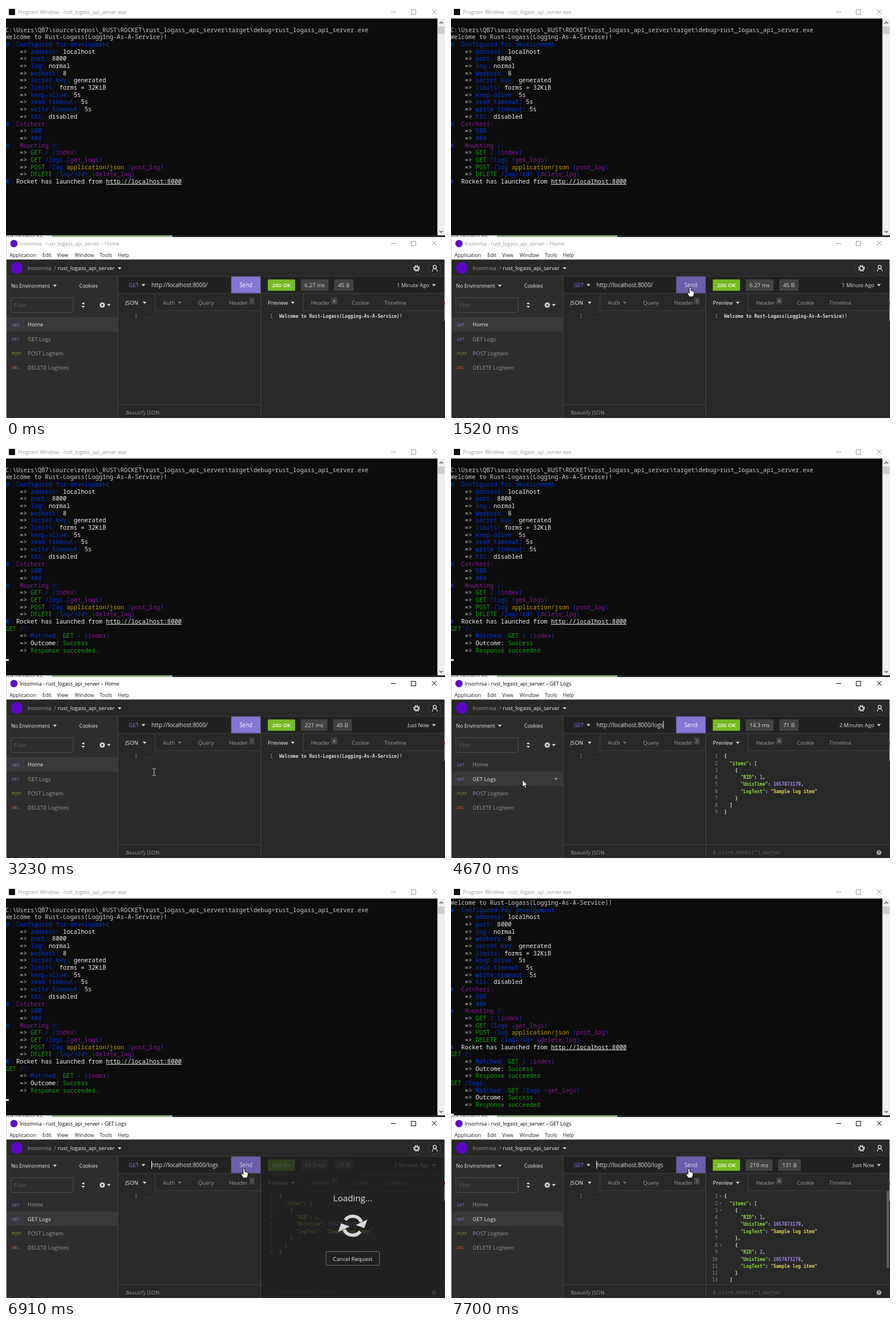
These frames come from a looping animation (773x724 px, 8000 ms). An HTML page:

```html
<!DOCTYPE html>
<html lang="en">
<head>
<meta charset="utf-8">
<title>API client and server</title>
<style>
  html, body { margin: 0; width: 100%; height: 100%; overflow: hidden; background: #282828; }
  svg { display: block; width: 773px; height: 724px; }
  text { white-space: pre; font-family: "Open Sans", "Noto Sans", sans-serif; }
  .term { font-family: "Noto Sans Mono", "DejaVu Sans Mono", monospace; }
  .code { font-family: "DejaVu Sans Mono", "Noto Sans Mono", monospace; }
  .body { font-weight: 700; }
</style>
</head>
<body>
<svg viewBox="0 0 773 724">
  <defs>
    <clipPath id="termClip"><rect y="22" width="759" height="382"/></clipPath>
    <clipPath id="stripClip"><rect y="403" width="80" height="4"/></clipPath>
    <clipPath id="codeClip"><rect x="449" y="537" width="323" height="163"/></clipPath>
  </defs>
  <g id="base"></g>
  <g id="live"></g>
</svg>
<script>
const LOOP = 8000;
const INK = {
  w: '#f2f2f2', d: '#cccccc', b: '#0037da', m: '#881798', g: '#13a10e', y: '#c19c00',
  k: '#8fdc3c', n: '#a98bf0', s: '#e6db5a', p: '#dddddd'
};
const PURPLE = '#8776d5', LINE = '#424242', PANE = '#282828';
const BAR = 490.5; // centre of the address row

const esc = s => s.replace(/&/g, '&amp;').replace(/</g, '&lt;').replace(/>/g, '&gt;');

// Shapes; text is placed by its vertical centre.
const rect = (x, y, w, h, fill, more = '') =>
  `<rect x="${x}" y="${y}" width="${w}" height="${h}" fill="${fill}" ${more}/>`;
const path = (d, stroke, width = 1, fill = 'none', more = '') =>
  `<path d="${d}" stroke="${stroke}" stroke-width="${width}" fill="${fill}" ${more}/>`;
const disc = (x, y, r, fill, more = '') =>
  `<circle cx="${x}" cy="${y}" r="${r}" fill="${fill}" ${more}/>`;
const label = (x, y, s, size, fill, more = '') =>
  `<text x="${x}" y="${y + size * .36}" font-size="${size}" fill="${fill}" ${more}>${esc(s)}</text>`;
const mid = (x, y, s, size, fill, more = '') => label(x, y, s, size, fill, `text-anchor="middle" ${more}`);
const caret = (x, y, fill = '#ddd') => path(`M${x - 3.4} ${y - 1.8}h6.8l-3.4 3.8z`, 'none', 0, fill);

// "~x" inside a line switches to ink x; "~u" underlines.
function inked(x, y, line, size, cls, start) {
  const bits = line.split(/~(\w)/);
  let out = `<tspan fill="${INK[start]}">${esc(bits[0])}</tspan>`;
  for (let i = 1; i < bits.length; i += 2) {
    const style = bits[i] === 'u' ? 'fill="#f2f2f2" text-decoration="underline"' : `fill="${INK[bits[i]]}"`;
    out += `<tspan ${style}>${esc(bits[i + 1])}</tspan>`;
  }
  return `<text class="${cls}" x="${x}" y="${y + size * .36}" font-size="${size}">${out}</text>`;
}

// ---- terminal ----
const setting = (key, value) => `    => ~b${key}: ~w${value}`;
const route = (verb, url, name, kind = '') => `    => ~g${verb} ~b${url} ~y${kind}~b(~m${name}~b)`;
const handled = (url, name) => [
  `~gGET ~b${url}:`,
  `    => ~bMatched: ~gGET ~b${url} (~m${name}~b)`,
  '    => ~wOutcome: ~gSuccess',
  '    => ~gResponse succeeded.'
];
const BOOT = [
  'C:\\Users\\QB7\\source\\repos\\_RUST\\ROCKET\\rust_logass_api_server\\target\\debug>rust_logass_api_server.exe',
  'Welcome to Rust-Logass(Logging-As-A-Service)!',
  '#~b  Configured for development.',
  setting('address', 'localhost'), setting('port', '8000'), setting('log', 'normal'),
  setting('workers', '8'), setting('secret key', 'generated'), setting('limits', 'forms = 32KiB'),
  setting('keep-alive', '5s'), setting('read timeout', '5s'), setting('write timeout', '5s'),
  setting('tls', 'disabled'),
  '#~m  Catchers:', '    => ~b500', '    => ~b404',
  '#~m   Mounting ~b/:',
  route('GET', '/', 'index'), route('GET', '/logs', 'get_logs'),
  route('POST', '/log', 'post_log', 'application/json '), route('DELETE', '/log/<id>', 'delete_log'),
  '#~w  Rocket has launched from ~uhttp://localhost:8000'
];

function terminal(t) {
  const lines = [...BOOT];
  if (t >= 2250) lines.push(...handled('/', 'index'));
  if (t >= 7030) lines.push(...handled('/logs', 'get_logs'));
  const pitch = 12.67, scrolled = t >= 7030 ? 2 : 0;
  let out = '';
  lines.forEach((line, i) => {
    if (i < scrolled - 1) return;
    const y = 42 + (i - scrolled) * pitch;
    if (line[0] === '#') {
      out += rect(.5, y - 2.5, 3.5, 5.5, '#0a1c58', `stroke="${INK.b}" stroke-width=".8"`);
      line = ' ' + line.slice(1);
    }
    out += inked(-1, y, line, 10.55, 'term', 'd');
  });
  if (t >= 2250) out += rect(0, 45.2 + (lines.length - scrolled) * pitch, 5, 3, INK.w);
  return `<g clip-path="url(#termClip)">${out}</g>`;
}

// ---- window chrome ----
const buttons = (y, ink) =>
  path(`M678 ${y + .5}h9M713.5 ${y - 3.5}h8v8h-8zM750 ${y - 4}l8 8m0-8l-8 8`, ink);

function base() {
  let out = rect(0, 0, 773, 724, PANE) + rect(0, 0, 773, 22, '#fff')
    + rect(5, 5, 11, 11, '#111')
    + label(21, 10.5, 'Program Window - rust_logass_api_server.exe', 9, '#999') + buttons(10, '#999')
    + rect(0, 22, 773, 382, '#0c0c0c') + rect(759.6, 22, 13.4, 382, '#f0f0f0')
    + rect(760.5, 36, 12, 13, '#cdcdcd')
    + path('M763.5 31l3-3 3 3M763.5 395l3 3 3-3', '#555', 1.4);

  out += rect(0, 403, 81, 4, '#e4e4e4') + rect(81, 403, 212, 3, '#93b673') + rect(293, 403, 480, 3, '#20252b')
    + `<g clip-path="url(#stripClip)">${label(0, 406.5, 'ed shelter to', 11, '#555')}</g>`
    + rect(0, 407, 1, 317, '#c8c8c8') + rect(772, 445, 1, 108, '#d8d8d8');

  out += rect(1, 406, 772, 39.5, '#fff') + disc(14, 417.5, 6.5, '#5a0ac4');
  [[6, 'Application'], [64, 'Edit'], [90, 'View'], [121, 'Window'], [165, 'Tools'], [197, 'Help']]
    .forEach(([x, s]) => out += label(x, 437.5, s, 9, '#222'));

  out += disc(19, 460.5, 10.5, '#5a0ac4') + label(38, 461, 'Insomnia', 9.7, '#999')
    + label(85, 461, '/', 9.7, '#888') + label(91, 461, 'rust_logass_api_server', 9.6, '#eee') + caret(200, 461)
    + disc(723, 461, 10.3, '#222', 'stroke="#454545"') + disc(755, 461, 10.3, '#222', 'stroke="#454545"')
    + disc(723, 461, 3.4, 'none', 'stroke="#eee" stroke-width="1.7"')
    + disc(723, 461, 5.2, 'none', 'stroke="#eee" stroke-width="1.8" stroke-dasharray="2 2.08"')
    + disc(755, 458.5, 2.8, 'none', 'stroke="#eee" stroke-width="1.3"')
    + path('M750.5 466.5c0-6.5 9-6.5 9 0', '#eee', 1.3);

  out += rect(1, 475.5, 196, 248.5, '#2d2d2d') + rect(198, 475.5, 250, 29, '#212121')
    + label(9, 491.5, 'No Environment', 9, '#eee') + caret(86, 491.5) + label(129, 491.5, 'Cookies', 9, '#eee')
    + rect(8.5, 512.5, 110, 26, 'none', 'rx="2" stroke="#4c4c4c"') + label(14, 525.5, 'Filter', 9, '#5c5c5c')
    + path('M133 524h6l-3-3.4zM133 527h6l-3 3.4z', 'none', 0, '#ddd')
    + disc(169.5, 525.5, 4.6, '#ddd') + path('M167 525.5h5M169.5 523v5', '#2d2d2d', 1.2) + caret(181, 525.5);

  out += path('M1 475h771M197.5 475v249M198 505h250M262.5 505v30M262 535.5h186M198 700.5h250M448.5 475v249', LINE)
    + label(216, BAR, 'GET', 9.8, PURPLE) + caret(242, BAR)
    + label(210, 521.5, 'JSON', 9.8, '#eee') + caret(244, 521.5)
    + label(276, 521.5, 'Auth', 9.8, '#999') + caret(306, 521.5, '#777')
    + label(338, 521.5, 'Query', 9.8, '#999') + label(393, 521.5, 'Header', 9.6, '#999')
    + rect(428, 512.5, 10, 12, '#424242', 'rx="1"') + mid(433, 518.5, '1', 7, '#bbb')
    + label(226.5, 545.5, '1', 8, '#777', 'class="code"') + label(243.5, 545.5, '...', 8, '#666', 'class="code"')
    + label(211, 714.5, 'Beautify JSON', 9.2, '#999');
  return out;
}

// ---- response pane ----
const item = (id, time, last) => [
  '    {', `      ~k"RID"~p: ~n${id}~p,`, `      ~k"UnixTime"~p: ~n${time}~p,`,
  '      ~k"LogText"~p: ~s"Sample log item"', last ? '    }' : '    },'
];
const logs = (...items) => ['{', '  ~k"items"~p: [', ...items.flat(), '  ]', '}'];
const HELLO = ['Welcome to Rust-Logass(Logging-As-A-Service)!'];
const REPLIES = [
  { from: 0, time: '6.27 ms', size: '45 B', age: '1 Minute Ago', tags: [519, 49, 578, 34], body: HELLO },
  { from: 2540, time: '221 ms', size: '45 B', age: 'Just Now', tags: [519, 47, 576, 33], body: HELLO },
  { from: 4550, time: '14.3 ms', size: '71 B', age: '2 Minutes Ago', tags: [519, 49, 578, 34], json: 1,
    folds: 4790, body: logs(item(1, 1657873179, true)) },
  { from: 7140, time: '219 ms', size: '131 B', age: 'Just Now', tags: [519, 47, 576, 40], json: 1,
    folds: 7580, body: logs(item(1, 1657873179), item(2, 1657873278, true)) }
];

const tag = (x, w, s, fill, ink, more) => rect(x, BAR - 10, w, 20, fill) + mid(x + w / 2, BAR, s, 9.7, ink, more);

function response(t) {
  const r = REPLIES.filter(e => t >= e.from).pop();
  const [tx, tw, sx, sw] = r.tags;
  let out = rect(449, 475.5, 323, 29, '#212121')
    + tag(461, 48, '200 OK', '#75ba24', '#fff', 'font-weight="600"')
    + tag(tx, tw, r.time, '#424242', '#ddd') + tag(sx, sw, r.size, '#424242', '#ddd')
    + label(745, BAR, r.age, 9.2, '#ddd', 'text-anchor="end"') + caret(753.5, BAR)
    + path('M449 505h323M523.5 505v30M523 535.5h249', LINE)
    + label(461, 521.5, 'Preview', 9.8, '#eee') + caret(505, 521.5)
    + label(537, 521.5, 'Header', 9.6, '#999') + rect(573, 512.5, 10, 12, '#424242', 'rx="1"')
    + mid(578, 518.5, '4', 7, '#bbb') + label(609, 521.5, 'Cookie', 9.6, '#999')
    + label(666, 521.5, 'Timeline', 9.8, '#999') + rect(771, 520, 2, 5, '#8c2f2f');

  let code = '';
  r.body.forEach((line, i) => {
    const y = 545.5 + i * 12.25;
    code += label(469.5, y, String(i + 1), 8, '#888', 'class="code" text-anchor="end"')
      + inked(481, y, line, 8, 'code body', 'p');
    if (t >= r.folds && /[{[]$/.test(line)) code += path(`M473 ${y - 1}h3.4l-1.7 2.4z`, 'none', 0, '#777');
  });
  out += `<g clip-path="url(#codeClip)">${code}</g>`;
  if (r.json) {
    out += path('M449 700.5h323', LINE)
      + label(461, 714, '$.store.books[*].author', 8.67, '#5e5e5e', 'class="code"')
      + disc(753.5, 714.5, 4.2, '#aaa') + mid(753.5, 714.5, '?', 7, PANE, 'font-weight="700"');
    if (r.body.length > 12) out += rect(767, 536, 4.5, 136, '#5a5a5a', 'rx="2"');
  }
  return out;
}

function loading(t) {
  const span = [[1970, 2540], [6800, 7140]].find(([a, b]) => t >= a && t < b);
  if (!span) return '';
  const half = path('M-15.9-5A16.7 16.7 0 0 1 12-11.6', '#d8d8d8', 5.8)
    + path('M20-18V-3.5H5.5z', '#d8d8d8', 1, '#d8d8d8', 'stroke-linejoin="round"');
  return rect(449, 475.5, 323, 248.5, '#202020', 'opacity=".8"')
    + mid(610.5, 548, 'Loading...', 15.3, '#e6e6e6')
    + `<g transform="translate(610.5 597) rotate(${(t - span[0]) * .18})">${half}<g transform="rotate(180)">${half}</g></g>`
    + rect(563.5, 642.5, 94, 24, '#202020', 'rx="2" stroke="#777"')
    + mid(610.5, 655, 'Cancel Request', 9.8, '#e6e6e6');
}

// ---- pointer ----
const stepped = (t, a, b, n) => Math.min(1, (Math.floor((t - a) / (b - a) * (n - 1) + 1e-6) + 1) / n);
const ease = (u, k) => 1 - (1 - u) ** k;
const mix = (a, b, u) => a + (b - a) * u;

function pointer(t) {
  if (t < 510) return null;
  if (t < 1400) {
    const u = stepped(t, 510, 1310, 8);
    return [mix(214, 421, u), mix(667, 498, u)];
  }
  if (t < 2990) return [421, t < 1520 ? 496 : 494];
  if (t < 5000) {
    const u = stepped(t, 2990, 3670, 7);
    return [mix(421, 126, ease(u, 1.4)), mix(494, 587, ease(u, 3.4))];
  }
  const u = stepped(t, 5000, 5670, 7);
  return [mix(126, 419, u), mix(587, 496, ease(u, 1.4))];
}

const overSend = p => p && p[0] > 396 && p[0] < 448 && p[1] > 476 && p[1] < 505;

function cursor(p) {
  if (!p) return '';
  const [x, y] = p;
  let shape;
  if (overSend(p)) {
    shape = path('M-1.6 1Q0-1 1.6 1V6l2 .5 2 .5 1.6 1V12L5.5 17H-1.5L-5 11-4.8 9.3-3 9.5-1.6 11Z', '#000', 1, '#fff');
  } else if (x > 198 && x < 448 && (y > 536 || y < 505)) {
    shape = path('M-3-6H-.7M.7-6H3M0-5.5V5.5M-3 6H-.7M.7 6H3', '#ddd');
  } else {
    shape = path('M0 0V12L2.8 9.5 4.8 14 6.8 13 4.9 8.8H8.6Z', '#000', .8, '#fff');
  }
  return `<g transform="translate(${x} ${y})">${shape}</g>`;
}

// ---- moving parts of the client ----
const ROWS = [['GET', 'Home', '#8f7fe0'], ['GET', 'GET Logs', '#8f7fe0'],
  ['POST', 'POST LogItem', '#75ba24'], ['DEL', 'DELETE LogItem', '#e0632a']];

function client(t) {
  const p = pointer(t), onLogs = t >= 4550, ink = t < 1970 ? '#999' : '#000';
  const title = 'Insomnia - rust_logass_api_server – ' + (onLogs ? 'GET Logs' : 'Home');
  let out = label(24, 417.5, title, 9, ink) + buttons(417, ink);

  ROWS.forEach(([verb, name, tint], i) => {
    const y = 560 + i * 25.2, chosen = i === (onLogs ? 1 : 0);
    const hover = i === 1 && t >= 4000 && t < 5000;
    if (chosen || hover) out += rect(1, 547 + i * 25, 196, 25, chosen ? '#393939' : '#333');
    out += label(10, y, verb, 7.3, tint) + label(38, y, name, 9.7, chosen ? '#eee' : '#999');
    if (chosen && hover) out += caret(185, y, '#999');
  });

  out += label(256, BAR, 'http://localhost:8000/' + (onLogs ? 'logs' : ''), 9.9, '#ddd');
  const atEnd = t >= 4550 && t < 5100 || t >= 5670 && t < 6240;
  const atStart = t >= 6690 && t < 7250 || t >= 7700;
  if (atEnd || atStart) out += rect(atEnd ? 373.5 : 256, 483, 1, 14, '#eee');

  const hot = overSend(p);
  out += rect(396.5, 475.5, 51.5, 29, hot ? '#6c5eab' : PURPLE) + mid(422.5, BAR, 'Send', 9.9, hot ? '#ddd' : '#fff');
  return out + response(t) + loading(t) + cursor(p);
}

const live = document.getElementById('live');
let shown = '';

function draw(t) {
  const next = terminal(t) + client(t);
  if (next !== shown) live.innerHTML = shown = next;
}

document.getElementById('base').innerHTML = base();
const t0 = performance.now();
function tick() {
  draw((performance.now() - t0) % LOOP);
  requestAnimationFrame(tick);
}
draw(0);
requestAnimationFrame(tick);
</script>
</body>
</html>
```
